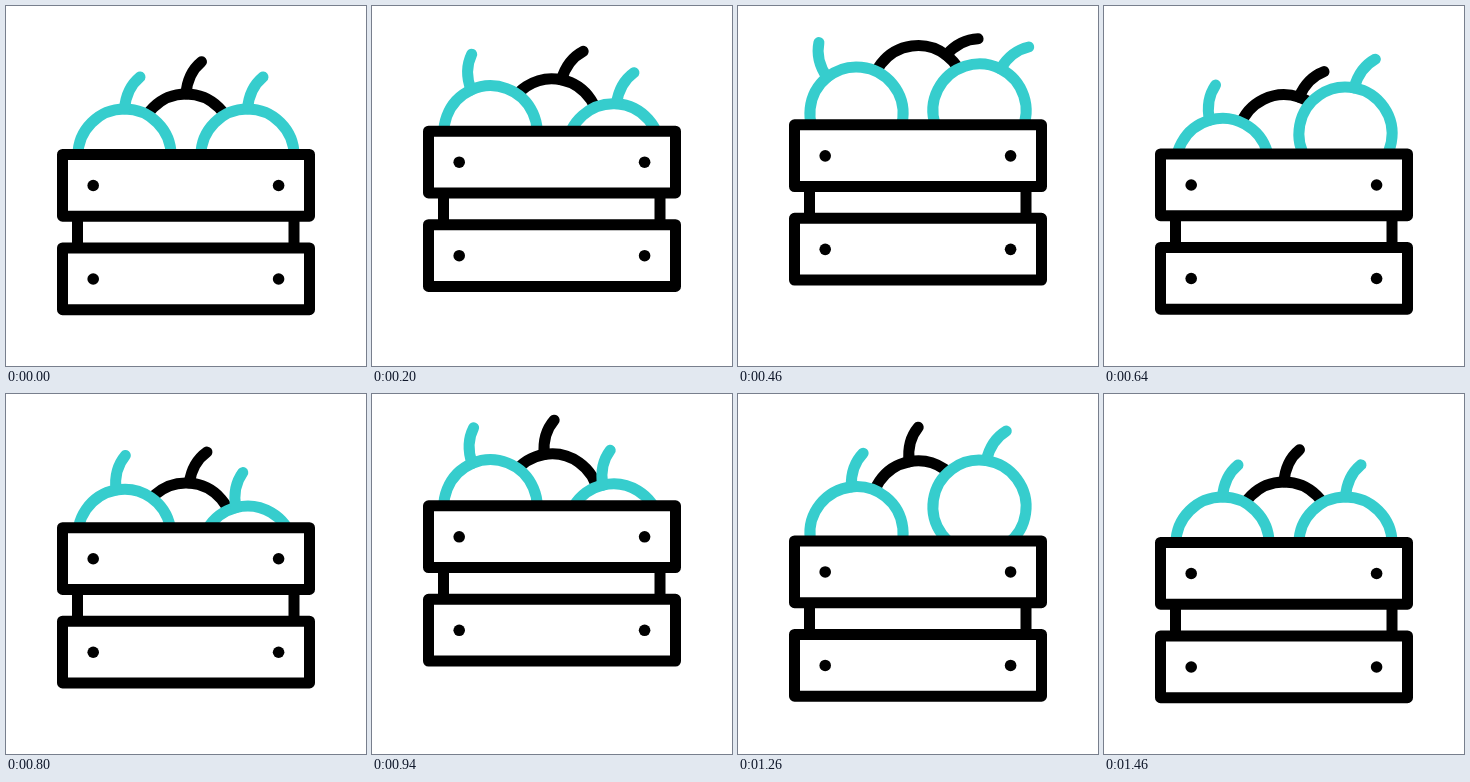
An HTML page for the animation above (2400 ms loop, 360 px wide and 360 px high).

```html
<!DOCTYPE html>
<html lang="en">
<head>
<meta charset="utf-8">
<title>Fruit crate</title>
<style>
  html, body { margin: 0; width: 100%; height: 100%; overflow: hidden; background: #fff; }
  svg { display: block; width: 100vw; height: 100vh; }
  .line { fill: #fff; stroke: #000; stroke-width: 11; stroke-linecap: round; stroke-linejoin: round; }
  .teal { stroke: #36cdcd; }
  .stem { fill: none; }
</style>
</head>
<body>
<svg viewBox="0 0 360 360">
  <defs>
    <g id="fruit">
      <circle r="46.6"/>
      <path class="stem" d="M0-46.6C1-60 6-71 15.5-78.8"/>
    </g>
    <g id="slat">
      <rect class="line" x="56.5" y="148.5" width="247" height="61.7"/>
      <circle cx="87.2" cy="179.5" r="5.8"/>
      <circle cx="272.6" cy="179.5" r="5.8"/>
    </g>
  </defs>
  <use id="middle" class="line" href="#fruit"/>
  <use id="left" class="line teal" href="#fruit"/>
  <use id="right" class="line teal" href="#fruit"/>
  <g id="crate">
    <rect class="line" x="71.5" y="200" width="216.5" height="50"/>
    <use href="#slat"/>
    <use href="#slat" y="93.5"/>
  </g>
</svg>
<script>
const LOOP = 2400;
const $ = id => document.getElementById(id);

// Eased value at time t for a list of [time, value] steps
function at(steps, t) {
  if (t <= steps[0][0]) return steps[0][1];
  for (let i = 1; i < steps.length; i++) {
    const [t0, a] = steps[i - 1], [t1, b] = steps[i];
    if (t < t1) {
      const u = (t - t0) / (t1 - t0);
      return a + (b - a) * u * u * (3 - 2 * u);
    }
  }
  return steps[steps.length - 1][1];
}

const crateY = [[0, 0], [360, -40], [660, 0], [1000, -40], [1295, 0]];
const fruitY = [[0, 0], [410, -48.5], [655, 10], [1050, -48.5], [1350, 0]];
const turn = (peak, a, b, c) => [[0, 0], [peak, a], [750, b], [1050, c], [1350, 0]];

const fruits = [
  { el: $("left"), x: 118.5, y: 149.7, delay: 0, spin: turn(370, -44, -9, -29.5) },
  { el: $("middle"), x: 180, y: 134.6, delay: 47, spin: turn(410, 37.3, 4, -25.2) },
  { el: $("right"), x: 241.5, y: 149.7, delay: 115, spin: turn(370, 27, -18, 11) }
];

function draw(t) {
  $("crate").setAttribute("transform", `translate(0 ${at(crateY, t)})`);
  for (const { el, x, y, delay, spin } of fruits) {
    const s = t - delay;
    el.setAttribute("transform", `translate(${x} ${y + at(fruitY, s)}) rotate(${at(spin, s)})`);
  }
}

let start;
function tick(now) {
  start ??= now;
  draw((now - start) % LOOP);
  requestAnimationFrame(tick);
}
draw(0);
requestAnimationFrame(tick);
</script>
</body>
</html>
```
